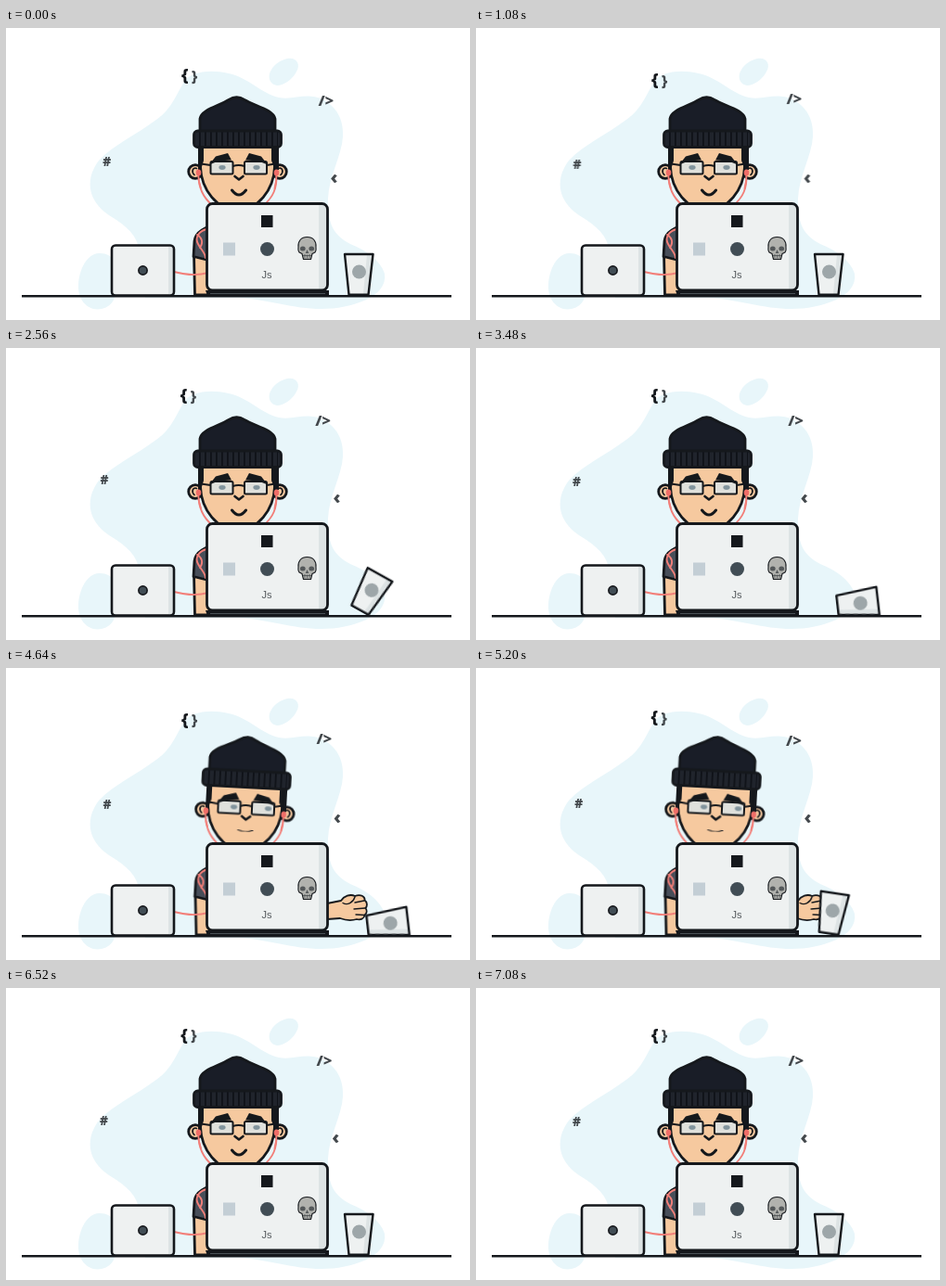
These frames come from a looping animation (500 by 315 pixels, 7.12 s). An HTML page:

```html
<!DOCTYPE html>
<html lang="en">
<head>
<meta charset="utf-8">
<title>Developer at a desk</title>
<style>
  html, body { margin: 0; width: 100%; height: 100%; overflow: hidden; background: #fff; }
  svg { display: block; width: 500px; height: 315px; }

  .blob { fill: #e8f6fa; }
  .ink { stroke: #15181c; stroke-width: 2.8; stroke-linejoin: round; stroke-linecap: round; }
  .thin { stroke-width: 1.7; }
  .skin { fill: #f6c99f; }
  .shell { fill: #eef1f1; }
  .shade { fill: #dde3e4; }
  .dark { fill: #15181c; }
  .slate { fill: #414d55; }
  .none { fill: none; }
  .wire { fill: none; stroke: #f27f79; stroke-width: 1.9; stroke-linecap: round; }
  .code { font: 800 15px "Open Sans", sans-serif; fill: #43484c; }

  .float { animation: 3560ms linear infinite; }
  .braces { animation-name: braces; }
  .hash { animation-name: hash; }
  .close { animation-name: close; }
  .less { animation-name: less; }

  .act { animation: 7120ms ease-in-out infinite; }
  .head { animation-name: lean; transform-origin: 250px 190px; }
  .body { animation-name: shift; }
  .eyes { animation-name: glance; }
  .mouth { animation-name: frown; transform-origin: 251px 175px; }
  .arm { animation-name: reach; }
  .cup { animation-name: tip; transform-origin: 390.5px 288px; }

  @keyframes braces {
    30.3% { transform: translate(0, 5px); }
    50% { transform: translate(-.5px, 1.5px); }
    66.3% { transform: translate(-1.2px, -.3px); }
    72% { transform: translate(-1.2px, .3px); }
    84% { transform: translate(-.6px, -.5px); }
  }
  @keyframes hash {
    30.3% { transform: translate(.3px, 3px); }
    50% { transform: translate(2.5px, 2px); }
    66.3% { transform: translate(-.2px, 0); }
    72% { transform: translate(-2.6px, -2px); }
    83% { transform: translate(-3.2px, -1.5px); }
    97.8% { transform: translate(-.2px, 0); }
  }
  @keyframes close {
    30.3% { transform: translate(-2px, -2px); }
    50% { transform: translate(-2.5px, 0); }
    66.3% { transform: translate(-2.2px, .8px); }
    72% { transform: translate(-3.2px, -.3px); }
    97.8% { transform: translate(-.2px, 0); }
  }
  @keyframes less {
    30.3% { transform: translate(3.5px, 0); }
    50% { transform: translate(4px, .8px); }
    66.3% { transform: translate(2px, .8px); }
    72% { transform: translate(3px, 0); }
    97.8% { transform: translate(.2px, 0); }
  }

  @keyframes lean {
    0%, 53.4%, 80.1%, 100% { transform: none; }
    59.7%, 73.7% { transform: translate(6px, 0) rotate(3deg); }
  }
  @keyframes shift {
    0%, 53.4%, 80.1%, 100% { transform: none; }
    59.7%, 73.7% { transform: translate(1.5px, 0); }
  }
  @keyframes glance {
    0%, 51%, 80.1%, 100% { transform: none; }
    54.5%, 75% { transform: translate(4.5px, 0); }
  }
  @keyframes frown {
    0%, 53.4%, 80.1%, 100% { transform: none; }
    57%, 75% { transform: scaleY(.22); }
  }
  @keyframes reach {
    0%, 58.5% { transform: translate(-62px, 0); }
    65.2% { transform: none; }
    67.5%, 68.3% { transform: translate(5px, 0); }
    74.4%, 75.1% { transform: translate(-16px, 0); }
    80.8%, 100% { transform: translate(-62px, 0); }
  }
  @keyframes tip {
    0% { transform: rotate(0); }
    30.9% { transform: rotate(0); animation-timing-function: cubic-bezier(.4, 0, .9, .85); }
    40.4%, 68.3% { transform: rotate(83.5deg); }
    74.4%, 100% { transform: rotate(0); }
  }
</style>
</head>
<body>
<svg viewBox="0 0 500 315">
  <g class="blob">
    <path d="M192 58C198 48 218 44 240 49C262 54 274 70 294 75C310 78 324 69 341 77C357 85 364 100 363 117C362 137 348 160 347 184C346 212 354 224 371 233C388 240 403 250 408 265C412 290 372 303 340 303C308 303 285 293 250 291H150L143 238C141 222 126 211 111 202C85 184 87 160 100 143C116 126 142 114 159 101C178 89 182 74 192 58Z"/>
    <path d="M100 243C114 242 122 254 121 270C120 287 117 300 103 303C88 306 77 293 78 277C79 260 87 244 100 243Z"/>
    <path d="M303 33C313 31 318 39 313 47C309 55 300 62 292 62C284 61 281 52 286 45C290 38 296 35 303 33Z"/>
  </g>

  <g class="float braces">
    <text class="code" x="188.7" y="57" style="font-size:18px;fill:#15181c">{</text>
    <text class="code" x="200" y="56.500" style="font-size:15px">}</text>
  </g>
  <text class="code float hash" x="104.2" y="149" style="font-size:13.5px">#</text>
  <text class="code float close" x="336.5" y="84" style="font-size:16.5px">/&gt;</text>
  <text class="code float less" x="349.500" y="167.500" style="font-size:20px">‹</text>

  <path class="ink none" style="stroke-width:2.5;stroke-linecap:butt" d="M17 289.2H480"/>

  <!-- torso and near arm -->
  <g class="act body">
    <path class="ink skin" d="M202.500 244L203.500 288H240V244Z"/>
    <path class="ink" fill="#474e59" d="M232 212C214 213 204 221 203 230L202 246.500L216 250H290V212Z"/>
    <path class="wire" d="M216 217C208 219 203 226 207 233C210 239 215 243 215 248M206 223C211 226 213 231 209 237"/>
  </g>
  <path class="wire" d="M181 263C192 266 204 268 218 264"/>

  <!-- head -->
  <g class="act head">
    <path class="wire" d="M207 158C208 173 212 182 222 191M291.500 158C292 173 288 182 278 191"/>
    <g class="ink skin">
      <circle cx="204" cy="155" r="7.300"/>
      <circle cx="295" cy="155" r="7.300"/>
      <path d="M209.500 122V150C210.500 175 228 196.500 249.500 196.500C271 196.500 288.500 175 289.500 150V122Z"/>
    </g>
    <path class="ink thin none" d="M205.500 151.500C201 150 199.500 155 203 158.500M293.500 151.500C298 150 299.500 155 296 158.500"/>
    <path class="dark" d="M207 126H213V143L210 153H207ZM294 126H286V143L290 153H294Z"/>

    <path class="wire" d="M207 157Q207.500 166 210 173M291.500 157Q291.500 166 289.500 173"/>
    <g fill="#ef6e68">
      <ellipse cx="207.500" cy="156" rx="2.800" ry="3.600"/>
      <ellipse cx="291.500" cy="156" rx="2.800" ry="3.600"/>
    </g>

    <g fill="#dfe0dc" stroke="#15181c" stroke-width="2">
      <rect x="220.500" y="144" width="24" height="13.500" rx="1.500"/>
      <rect x="257" y="144" width="24" height="13.500" rx="1.500"/>
      <path fill="none" d="M244.500 149Q250.500 147 257 149M220.500 148L210 146.500M281 148L290 146.500"/>
    </g>
    <g class="act eyes" fill="#82949d">
      <ellipse cx="233" cy="150.500" rx="3.600" ry="2.400"/>
      <ellipse cx="270" cy="150.500" rx="3.600" ry="2.400"/>
    </g>
    <path class="dark" d="M219 147.500L226 138.500L239 135L243 142.500L229 143.500ZM282 147.500L275 138.500L262 135L258 142.500L272 143.500Z"/>
    <path class="ink none" style="stroke-width:2.600" d="M246.500 160L251 163.500L255.500 160"/>
    <path class="act mouth ink none" style="stroke-width:3" d="M243.500 175Q251 185 258.500 175"/>

    <path class="ink" fill="#191d27" d="M209 115V98C210 88 230 84 240 77.500Q248.500 72 257 77.500C268 84 288 88 290 98V115Z"/>
    <rect class="ink" fill="#20242c" x="202.500" y="111" width="94" height="17.500" rx="4"/>
    <path fill="none" stroke="#0f1218" stroke-width="15" stroke-dasharray="1.800 4.200" d="M208 119.700H293"/>
  </g>

  <!-- reaching arm -->
  <g class="act arm">
    <path class="ink skin" style="stroke-width:1.800" d="M290 250L346 254L361 251C364 246 371 243.500 376 246C382 243.500 387 246.500 386.500 250.500C389.500 252.500 389.500 257 387.500 259C389.500 262 388.500 265 386.500 266.500C386 270.500 382 272 378 271C371 273 364 271.500 360 270L346 271L290 273Z"/>
    <path class="ink none" style="stroke-width:1.400" d="M386 251L376 253M387 259L375 260M386 266.500L377 266M363 253.500C368 256.500 374 253 376 247"/>
  </g>

  <!-- cup -->
  <g class="act cup">
    <path class="shell" d="M365 244H395.500L390.500 287.700H369.500Z"/>
    <path class="shade" d="M389 244H395L390.500 287H385Z"/>
    <circle cx="380.500" cy="263" r="7.500" fill="#9da6a9"/>
    <path class="ink none" style="stroke-width:2.400" d="M365 244H395.500L390.500 287.700H369.500Z"/>
  </g>

  <!-- left laptop -->
  <rect class="shell" x="114" y="234.500" width="67" height="54" rx="4"/>
  <path class="shade" d="M175 236H180V287H175Z"/>
  <rect class="ink none" style="stroke-width:2.600" x="114" y="234.500" width="67" height="54" rx="4"/>
  <circle class="ink slate thin" cx="147.500" cy="261.500" r="4.600"/>

  <!-- main laptop -->
  <path class="dark" d="M215 283H348V289H217Z"/>
  <path d="M220 286.500H344" stroke="#4a5157" stroke-width="1"/>
  <rect class="shell" x="216.500" y="189.500" width="130" height="93.500" rx="6"/>
  <path class="shade" d="M337 191H341Q345 191 345 195V278Q345 282 341 282H337Z"/>
  <rect class="ink none" x="216.500" y="189.500" width="130" height="93.500" rx="6"/>
  <rect class="dark" x="275" y="202" width="12.500" height="13"/>
  <rect x="234" y="231.500" width="13" height="14" fill="#c3ced5"/>
  <circle class="slate" cx="281.500" cy="238.500" r="7.500"/>
  <text x="281" y="270" text-anchor="middle" font-family="Liberation Sans, sans-serif" font-size="11" fill="#555a5e">Js</text>

  <!-- skull sticker -->
  <path class="ink" style="stroke-width:1.100" fill="#b1b2ae" d="M324.500 225.500C331 225.500 334.500 230 334 236C333.800 238 335 240 333 242L330 243.500L328.500 249.500H320.500L319 243.500L316 242C314 240 315.200 238 315 236C314.500 230 318 225.500 324.500 225.500Z"/>
  <g fill="#54585a">
    <ellipse cx="319.800" cy="238" rx="2.900" ry="2.500"/>
    <ellipse cx="329.200" cy="238" rx="2.900" ry="2.500"/>
    <path d="M324.500 239L326.300 243H322.700Z"/>
  </g>
  <path d="M320 245.500H329M322 244V248.500M324.500 244.500V248.500M327 244V248.500" stroke="#4b4f51" stroke-width=".8"/>
</svg>
</body>
</html>
```
